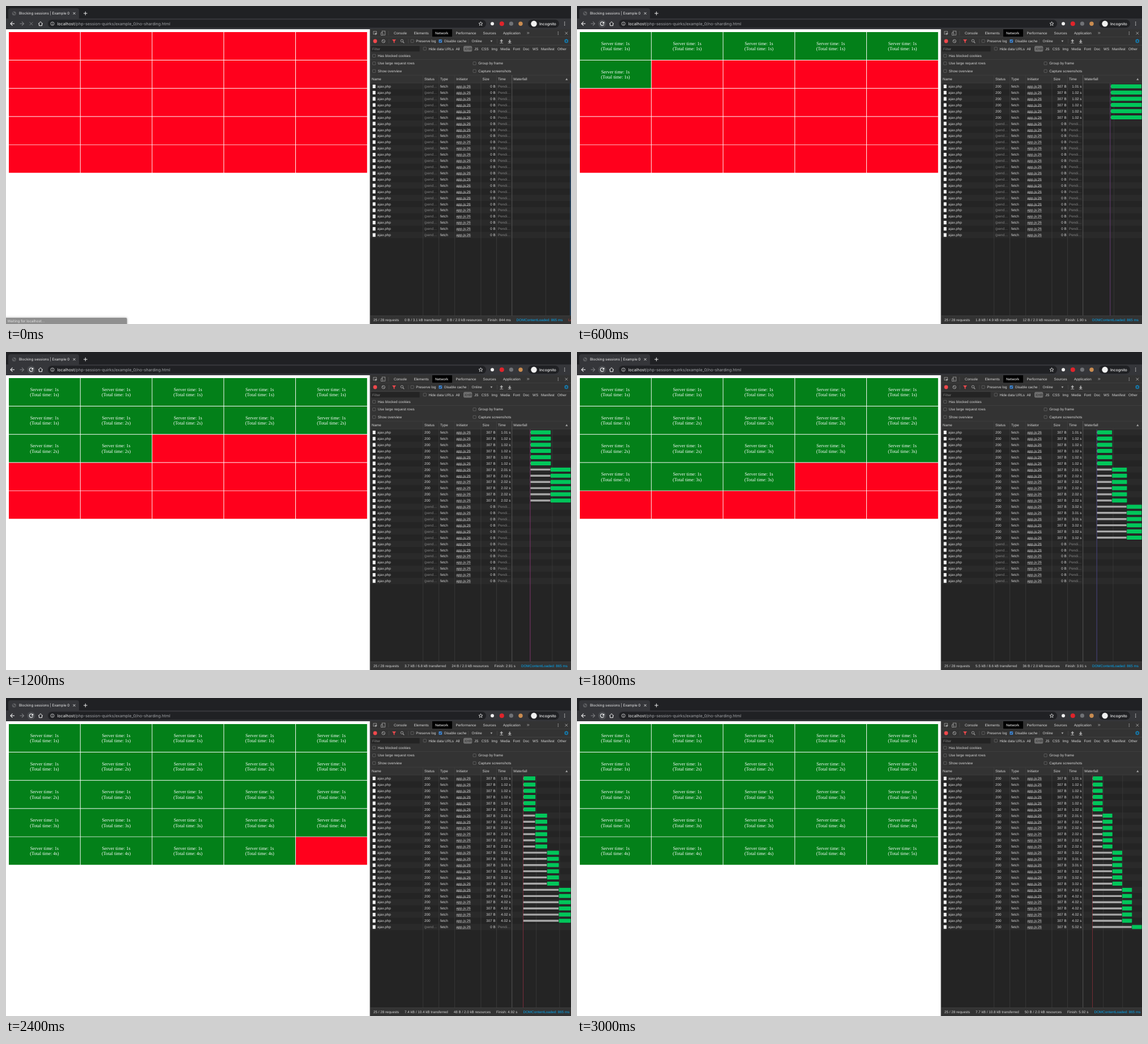
An HTML page with a canvas that plays this animation: 998x561 px, repeating every 3600 ms.

```html
<!DOCTYPE html>
<html lang="en">
<head>
<meta charset="utf-8">
<title>Blocking sessions</title>
<style>
  html, body { margin: 0; width: 100%; height: 100%; overflow: hidden; background: #fff; }
  canvas { display: block; }
</style>
</head>
<body>
<canvas id="stage" width="998" height="561"></canvas>
<script>
const ctx = document.getElementById('stage').getContext('2d');

const STEP = 600, STEPS = 6, REQUESTS = 25, BATCH = 6;
const SANS = '"Liberation Sans", Arial, sans-serif';
const UI = 'Inter, sans-serif';
const SERIF = '"Liberation Serif", Times, serif';
const SMALL = 6.3, ZOOM = 10;
const LIGHT = '#d6d6d6', DIM = '#858585', ICON = '#a6a6a6', BAR = '#333333', BODY = '#242424';

// [transferred, resources, finish] for every step
const SUMMARY = [
  ['0 B / 3.1', '0', '844 ms'],
  ['1.8 kB / 4.9', '12', '1.90 s'],
  ['3.7 kB / 6.8', '24', '2.91 s'],
  ['5.5 kB / 8.6', '36', '3.91 s'],
  ['7.4 kB / 10.4', '48', '4.92 s'],
  ['7.7 kB / 10.8', '50', '5.92 s']
];
const EVENT_COLORS = ['#26598c', '#673d75', '#80366f', '#4b4683', '#7c2f3f', '#762e35'];
const FAST_ROWS = [0, 6, 13, 14];

function rect(x, y, w, h, color, radius = 0) {
  ctx.fillStyle = color;
  ctx.beginPath();
  ctx.roundRect(x, y, w, h, radius);
  ctx.fill();
}

function disc(x, y, r, color) {
  ctx.fillStyle = color;
  ctx.beginPath();
  ctx.arc(x, y, r, 0, Math.PI * 2);
  ctx.fill();
}

function ring(x, y, r, color, width = 0.8, from = 0, to = Math.PI * 2) {
  ctx.strokeStyle = color;
  ctx.lineWidth = width;
  ctx.beginPath();
  ctx.arc(x, y, r, from, to);
  ctx.stroke();
}

function trace(points) {
  ctx.beginPath();
  points.forEach(([x, y]) => ctx.lineTo(x, y));
}

function line(points, color, width = 0.8) {
  trace(points);
  ctx.strokeStyle = color;
  ctx.lineWidth = width;
  ctx.stroke();
}

function poly(points, color) {
  trace(points);
  ctx.fillStyle = color;
  ctx.fill();
}

// Text is set large and scaled down so that advances stay fractional.
// y is the middle of the capitals; returns the drawn width.
function text(str, x, y, { color = LIGHT, size = SMALL, font = SANS, align = 'left', weight = 400 } = {}) {
  ctx.save();
  ctx.translate(x, y + size * 0.35);
  ctx.scale(1 / ZOOM, 1 / ZOOM);
  ctx.font = `${weight} ${size * ZOOM}px ${font}`;
  ctx.textRendering = 'geometricPrecision';
  ctx.textAlign = align;
  ctx.fillStyle = color;
  ctx.fillText(str, 0, 0);
  const width = ctx.measureText(str).width / ZOOM;
  ctx.restore();
  return width;
}

function labels(y, items) {
  for (const [str, x] of items) text(str, x, y);
}

function cross(x, y, r, color, width) {
  line([[x - r, y - r], [x + r, y + r]], color, width);
  line([[x - r, y + r], [x + r, y - r]], color, width);
}

function dots(x, y, gap, color) {
  for (let i = -1; i <= 1; i++) disc(x, y + i * gap, 0.75, color);
}

function arrow(x, y, dir, color) {
  line([[x - 3.5 * dir, y], [x + 3.5 * dir, y]], color, 1.1);
  line([[x, y - 3.5], [x + 3.5 * dir, y], [x, y + 3.5]], color, 1.1);
}

function transferArrow(x, dir) {
  poly([[x - 3, 62], [x, 62 - 3.6 * dir], [x + 3, 62]], ICON);
  rect(x - 1, dir > 0 ? 62 : 59.5, 2, 2.5, ICON);
  rect(x - 3, 65, 6, 0.8, ICON);
}

function checkbox(label, x, y, checked) {
  if (checked) {
    rect(x - 2.9, y - 2.9, 5.8, 5.8, '#3e86d4', 1);
    line([[x - 1.6, y], [x - 0.4, y + 1.4], [x + 1.7, y - 1.6]], '#222', 0.9);
  } else {
    ctx.strokeStyle = '#767676';
    ctx.lineWidth = 0.6;
    ctx.beginPath();
    ctx.roundRect(x - 2.6, y - 2.6, 5.2, 5.2, 0.8);
    ctx.stroke();
  }
  text(label, x + 6.6, y);
}

function drawBrowser(loading) {
  rect(0, 0, 998, 22, '#202124');
  rect(4, 4, 125, 20, '#35363a', 4);
  rect(0, 22, 998, 19, '#35363a');
  disc(14.3, 13, 3.6, '#5c5d60');
  line([[12.2, 10.8], [14.2, 13.2], [16.5, 14.5]], '#303134', 1.2);
  text('Blocking sessions | Example 0', 23, 13, { color: '#eee', size: 6.24, font: UI });
  cross(120.5, 13, 2, '#e0e0e0', 0.9);
  line([[137, 13], [143.6, 13]], '#eee', 1);
  line([[140.3, 9.7], [140.3, 16.3]], '#eee', 1);

  arrow(11.5, 31.2, -1, '#f2f2f2');
  arrow(28, 31.2, 1, '#7d7e81');
  if (loading) {
    cross(44.5, 31.2, 2.8, '#7d7e81', 1);
  } else {
    disc(44.5, 31.2, 7, '#484a4e');
    ring(44.5, 31.2, 3.2, '#f2f2f2', 1.1, 0.35, 5.5);
    poly([[48.2, 27.5], [48.2, 31], [44.7, 31]], '#f2f2f2');
  }
  line([[57, 31.5], [61, 27.7], [65, 31.5]], '#f2f2f2', 1);
  line([[58.4, 30.8], [58.4, 34.7], [63.6, 34.7], [63.6, 30.8]], '#f2f2f2', 1);

  rect(74, 24.2, 774, 14, '#202124', 7);
  ring(82, 31.2, 3.1, '#d8d8d8', 0.8);
  rect(81.6, 30.7, 0.9, 2.3, '#d8d8d8');
  rect(81.6, 29.2, 0.9, 0.9, '#d8d8d8');
  const url = { size: 7.2, font: UI };
  const host = text('localhost', 90.5, 31, { ...url, color: '#f2f2f2' });
  text('/php-session-quirks/example_0/no-sharding.html', 90.5 + host, 31, { ...url, color: '#a4a6aa' });

  const star = Array.from({ length: 11 }, (_, i) => {
    const a = i * Math.PI / 5 - Math.PI / 2, r = i % 2 ? 1.6 : 3.7;
    return [838.5 + r * Math.cos(a), 31.4 + r * Math.sin(a)];
  });
  line(star, '#e4e4e4', 0.8);
  disc(859, 31.3, 3, '#f0f0f0');
  disc(875.8, 31.2, 4, '#e0242b');
  disc(892.4, 31.2, 3.6, '#707276');
  disc(909, 31.2, 3.7, '#c98c50');
  rect(922, 24, 55, 14.4, '#202124', 7.2);
  disc(932.5, 31.2, 5.2, '#f1f1f1');
  text('Incognito', 942, 31.2, { color: '#f2f2f2', size: 6.7, font: UI, weight: 500 });
  dots(986.7, 31.2, 2.6, '#e8e8e8');
}

function drawPage(step, done) {
  rect(0, 41, 643, 520, '#fff');
  for (let i = 0; i < REQUESTS; i++) {
    const x = 5 + (i % 5) * 126.75, y = 46.1 + Math.floor(i / 5) * 49.8;
    rect(x, y, 125.8, 48.9, i < done ? '#038019' : '#ff001c');
    if (i >= done) continue;
    const style = { color: '#fff', size: 8.32, font: SERIF, align: 'center' };
    text('Server time: 1s', x + 62.9, y + 19.7, style);
    text(`(Total time: ${Math.floor(i / BATCH) + 1}s)`, x + 62.9, y + 29.2, style);
  }
  if (step === 0) {
    ctx.save();
    ctx.shadowColor = 'rgba(0,0,0,.3)';
    ctx.shadowBlur = 4;
    rect(-4, 550, 217.7, 16, '#8f8f8f', 2);
    ctx.restore();
    text('Waiting for localhost...', 2.5, 555.6, { color: '#e4e4e4', size: 6.24, font: UI });
  }
}

function drawTools() {
  rect(643, 41, 355, 520, BODY);
  rect(643, 41, 355, 95, BAR);
  rect(753, 41, 35, 13.6, '#000');
  for (const y of [54.5, 68.8, 94.2, 121.7, 135.8]) rect(643, y, 355, 0.6, '#484848');

  ctx.strokeStyle = ICON;
  ctx.lineWidth = 0.8;
  ctx.strokeRect(649, 44.8, 5.5, 5);
  poly([[651.4, 47], [656, 48.8], [653.8, 49.6], [652.8, 51.7]], ICON);
  ctx.strokeRect(664.2, 44.2, 5.5, 7);
  rect(662.2, 47.2, 3.4, 4.6, BAR);
  ctx.strokeRect(662.4, 47.2, 3, 4.3);
  for (const [x, y] of [[675.5, 44], [676, 58], [710.5, 58], [816, 58], [867, 58]]) rect(x, y, 0.6, 8, '#505050');
  labels(48, [['Console', 685], ['Elements', 720.5], ['Performance', 794.5], ['Sources', 842.5], ['Application', 878]]);
  text('Network', 758, 48, { color: '#fff' });
  text('»', 919.8, 47.3, { size: 9, color: ICON });
  dots(975.3, 48, 2.3, ICON);
  cross(989.8, 48, 2.3, ICON, 0.9);

  disc(652, 62, 3.4, '#f0484c');
  ring(666.7, 62, 2.8, ICON, 0.9);
  line([[664.7, 60], [668.7, 64]], ICON, 0.9);
  poly([[682, 59], [689, 59], [686.4, 62.2], [686.4, 65.5], [684.6, 64.6], [684.6, 62.2]], '#e8484c');
  ring(699.4, 61.3, 2.2, ICON, 0.9);
  line([[701, 63], [703.3, 65.4]], ICON, 1.1);
  checkbox('Preserve log', 717.6, 61.8);
  checkbox('Disable cache', 767.3, 61.8, true);
  text('Online', 822.6, 61.8);
  poly([[855.5, 60.7], [859.3, 60.7], [857.4, 63.7]], ICON);
  transferArrow(875.2, 1);
  transferArrow(889.7, -1);
  ring(989.8, 61.8, 2.2, '#0e8ac8', 1.2);
  for (let i = 0; i < 8; i++) {
    const a = i * Math.PI / 4, c = Math.cos(a), s = Math.sin(a);
    line([[989.8 + 2.6 * c, 61.8 + 2.6 * s], [989.8 + 3.8 * c, 61.8 + 3.8 * s]], '#0e8ac8', 1.1);
  }

  rect(645, 70.6, 85.5, 9.6, BODY);
  text('Filter', 647, 75.5, { color: DIM });
  checkbox('Hide data URLs', 739.8, 75.3);
  rect(808, 70.4, 15.3, 10, '#707070', 2.5);
  text('XHR', 809.5, 75.3, { color: '#2c2c2c' });
  labels(75.3, [['All', 794.5], ['JS', 827.2], ['CSS', 839.7], ['Img', 857.5], ['Media', 873.2], ['Font', 895.5],
    ['Doc', 913.3], ['WS', 930], ['Manifest', 945], ['Other', 974]]);
  checkbox('Has blocked cookies', 650.2, 87.8);
  checkbox('Use large request rows', 650.2, 101.2);
  checkbox('Show overview', 650.2, 114.8);
  checkbox('Group by frame', 827.6, 101.2);
  checkbox('Capture screenshots', 827.6, 114.8);
  labels(129.2, [['Name', 646], ['Status', 739], ['Type', 767], ['Initiator', 795.3], ['Size', 841.5],
    ['Time', 869], ['Waterfall', 896]]);
  poly([[988.2, 130.8], [992.4, 130.8], [990.3, 127.2]], ICON);
}

function drawRequests(step, done) {
  const top = 136.4, pitch = 10.92;
  for (let i = 0; i < REQUESTS; i += 2) rect(643, top + i * pitch, 355, pitch, '#2a2a2a');
  for (const x of [736.4, 764.4, 792.4, 838.6, 866.3]) rect(x, 122, 0.7, 424, '#404040');
  rect(893.2, 122, 1, 424, '#555');

  // The time axis shrinks as the log grows.
  const origin = 895.6, firstStart = 0.888;
  const total = step ? step + firstStart + 0.02 : 0.87;
  const scale = 101.9 / total;
  const at = seconds => origin + seconds * scale;
  const tick = [0.5, 1][step] || 2;
  for (let s = tick; s < total; s += tick) rect(at(s) - 1.1, top, 0.7, 409.6, '#3d3d3d');
  rect(at(0.865) - 0.5, top, 1, 409.6, EVENT_COLORS[step]);

  for (let i = 0; i < REQUESTS; i++) {
    const y = top + (i + 0.5) * pitch, ready = i < done;
    const batch = Math.floor(i / BATCH) + 1;
    const seconds = batch + (FAST_ROWS.includes(i) ? 0.01 : 0.02);
    const color = ready ? LIGHT : DIM;
    rect(647.7, y - 3.1, 5, 6.3, '#f3f3f3', 0.5);
    text('ajax.php', 656, y);
    text(ready ? '200' : '(pend…', 739, y, { color });
    text('fetch', 767, y);
    const width = text('app.js:26', 795.3, y);
    rect(795.3, y + 2.9, width, 0.5, LIGHT);
    text(ready ? '307 B' : '0 B', 864.6, y, { align: 'right' });
    text(ready ? `${seconds.toFixed(2)} s` : 'Pendi…', ready ? 891.5 : 869, y, { color, align: ready ? 'right' : 'left' });
    if (!ready) continue;
    const start = at(firstStart), send = at(firstStart + batch - 1), end = at(firstStart + seconds);
    rect(start - 0.3, y - 1.7, Math.max(send - start, 1.2), 3.4, '#a8a8a8');
    rect(send + 0.3, y - 3.5, end - send - 0.3, 7, '#00c65a', 0.7);
  }
}

function drawSummary(step) {
  const [transferred, resources, finish] = SUMMARY[step];
  rect(643, 546, 355, 15, BAR);
  rect(643, 546, 355, 0.6, '#484848');
  let x = 649;
  const add = (str, color) => { x += text(str, x, 553.6, { color }) + 9.9; };
  add('25 / 28 requests');
  add(`${transferred} kB transferred`);
  add(`${resources} B / 2.0 kB resources`);
  add(`Finish: ${finish}`);
  add('DOMContentLoaded: 865 ms', '#03a9f4');
  if (step === 0) add('Load: 871 ms', '#e0443c');
}

function draw(now) {
  const step = Math.floor(now / STEP) % STEPS;
  const done = Math.min(step * BATCH, REQUESTS);
  drawBrowser(step === 0);
  drawPage(step, done);
  drawTools();
  drawRequests(step, done);
  drawSummary(step);
  rect(642.6, 41, 0.8, 520, '#555');
}

let began;
function tickFrame(now) {
  began ??= now;
  draw(Math.max(0, now - began));
  requestAnimationFrame(tickFrame);
}
requestAnimationFrame(tickFrame);
</script>
</body>
</html>
```
